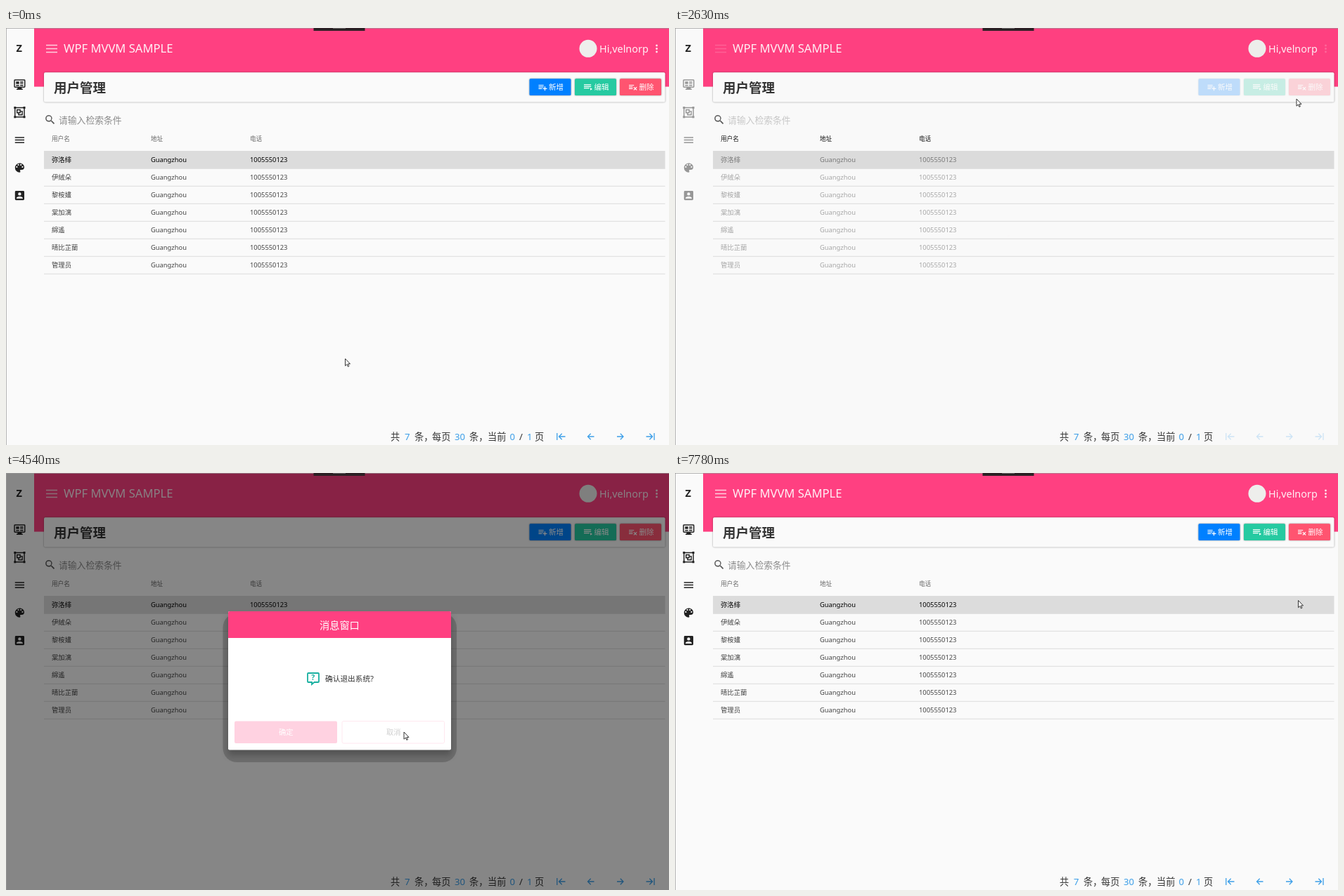
Animation, 943 px wide and 594 px high, one loop 8 s. Source, as an HTML page:

```html
<!DOCTYPE html>
<html lang="zh-CN">
<head>
<meta charset="utf-8">
<title>WPF MVVM SAMPLE</title>
<style>
  html, body { margin: 0; width: 100%; height: 100%; overflow: hidden; background: #fafafa; }
  svg { display: block; width: 100vw; height: 100vh; font-family: "Noto Sans", "Noto Sans CJK SC", "Noto Sans CJK", sans-serif; }
  text { white-space: pre; }
  .line { fill: none; }
  .raised { filter: drop-shadow(0 .7px 1.3px rgba(0, 0, 0, .4)); }
  .off .faint { opacity: .23; }
  .off .soft { opacity: .45; }
  .off .heading { fill: #111; }
  .closing .choice { opacity: .23; }
</style>
</head>
<body>
<svg id="stage" viewBox="0 0 943 594"></svg>
<script>
const PINK = '#ff4081', BLUE = '#3d9fe8', INK = '#222';

// Markup helpers
const rect = (x, y, w, h, fill, extra = '') =>
  `<rect x="${x}" y="${y}" width="${w}" height="${h}" fill="${fill}" ${extra}/>`;
const circle = (x, y, r, fill, extra = '') =>
  `<circle cx="${x}" cy="${y}" r="${r}" fill="${fill}" ${extra}/>`;
const text = (x, middle, size, value, fill = '#333', extra = '') =>
  `<text x="${x}" y="${middle + size * .36}" font-size="${size}" fill="${fill}" ${extra}>${value}</text>`;
const line = (d, color, width, extra = '') =>
  `<path class="line" d="${d}" stroke="${color}" stroke-width="${width}" ${extra}/>`;
const icon = (x, y, scale, d, fill) =>
  `<path transform="translate(${x} ${y}) scale(${scale}) translate(-12 -12)" d="${d}" fill="${fill}" fill-rule="evenodd"/>`;
const group = (cls, ...parts) => `<g class="${cls}">${parts.join('')}</g>`;

const ICONS = {
  dashboard: 'M21 16V4H3V16ZM21 2A2 2 0 0 1 23 4V16A2 2 0 0 1 21 18H16V20H18V22H6V20H8V18H3A2 2 0 0 1 1 16V4A2 2 0 0 1 3 2ZM5 6H11V11H5ZM13 6H19V8H13ZM13 9H19V11H13ZM5 12.500H11V14.500H5ZM13 12.500H19V14.500H13Z',
  frame: 'M1 1V5H2V19H1V23H5V22H19V23H23V19H22V5H23V1H19V2H5V1ZM5 4H19V5H20V19H19V20H5V19H4V5H5ZM6 6V14H9V18H18V9H14V6ZM8 8H12V12H8ZM14 11H16V16H11V14H14Z',
  menu: 'M3 6H21V8H3ZM3 11H21V13H3ZM3 16H21V18H3Z',
  palette: 'M12 3A9 9 0 0 0 12 21A1.5 1.5 0 0 0 13.1 18.5A1.5 1.5 0 0 1 14.2 16H16A5 5 0 0 0 21 11C21 6.6 17 3 12 3Z',
  account: 'M6 17C6 15 10 13.9 12 13.9S18 15 18 17V18H6ZM15 9A3 3 0 0 1 9 9A3 3 0 0 1 15 9ZM3 5V19A2 2 0 0 0 5 21H19A2 2 0 0 0 21 19V5A2 2 0 0 0 19 3H5A2 2 0 0 0 3 5Z',
  search: 'M9.5 3A6.5 6.5 0 0 1 14.4 13.7L14.7 14H15.5L20.5 19 19 20.5 14 15.5V14.7L13.7 14.4A6.5 6.5 0 1 1 9.5 3ZM9.5 5A4.5 4.5 0 0 0 9.5 14A4.5 4.5 0 0 0 9.5 5Z',
  add: 'M2 6H14V8H2ZM2 10H14V12H2ZM2 14H10V16H2ZM16 10H18V14H22V16H18V20H16V16H12V14H16Z',
  edit: 'M2 5H19V7H2ZM2 9H19V11H2ZM2 13H15V15H2ZM17 13V19L22 16Z',
  remove: 'M2 6H14V8H2ZM2 10H11V12H2ZM2 14H11V16H2ZM14.2 10.8L17 13.6 19.8 10.8 21.2 12.2 18.4 15 21.2 17.8 19.8 19.2 17 16.4 14.2 19.2 12.8 17.8 15.6 15 12.8 12.2Z'
};

function sidebar() {
  const names = ['dashboard', 'frame', 'menu', 'palette', 'account'];
  const dots = [[6.5, 10.5], [9.5, 6.5], [14.5, 6.5], [17.5, 10.5]]
    .map(([x, y]) => circle(19.4 + (x - 12) * .735, 199 + (y - 12) * .735, 1.1, '#fafafa'));
  return rect(0, 0, 40, 594, '#fafafa') +
    text(14.4, 28.5, 14.5, 'Z', INK, 'font-weight="700"') +
    group('soft', ...names.map((name, i) => icon(19.4, 80.6 + 39.5 * i, .735, ICONS[name], INK)), ...dots);
}

function header() {
  return rect(40, 0, 903, 83.6, PINK) +
    group('faint', line('M57 24.5h16M57 29.5h16M57 34.5h16', '#ffd0df', 1.6)) +
    text(82, 29.5, 16.6, 'WPF MVVM SAMPLE', '#fff0f5') +
    circle(828, 29.3, 12.5, '#eeeeec') +
    text(844, 30, 14.4, 'Hi,velnorp', '#fff0f5') +
    group('faint', ...[25, 29.5, 34].map(y => circle(925.5, y, 1.4, '#ffe3ec')));
}

function toolbar() {
  const button = (x, color, name, label) => group('faint',
    rect(x, 72.3, 59, 23.7, color, 'rx="1.5" class="raised"'),
    icon(x + 19, 84.5, .6, ICONS[name], '#fff'), text(x + 27.5, 84.3, 10.6, label, '#fff'));
  return rect(54, 63.3, 883.5, 42.2, '#fafafa', 'rx="2" class="raised"') +
    text(68, 85.3, 18.5, '用户管理', '#333', 'font-weight="700"') +
    button(744.5, '#0080ff', 'add', '新增') +
    button(809, '#26caa1', 'edit', '编辑') +
    button(873, '#ff5470', 'remove', '删除');
}

function table() {
  const columns = [65, 206, 347];
  const people = ['弥洛绯', '伊絨朵', '黎桉嫿', '棠加漓', '綿遙', '晴比芷蘭', '管理员'];
  const heads = ['用户名', '地址', '电话'].map((label, i) =>
    text(columns[i], 158.3, 8.6, label, '#666', 'class="heading"'));
  const rows = people.map((name, i) => {
    const y = 175 + 25 * i;
    const cells = [name, 'Guangzhou', '1005550123'].map((value, c) =>
      text(columns[c], y + 13, 9.35, value, i ? '#444' : '#000'));
    return (i ? '' : rect(54, y, 883.5, 25, '#dcdcdc')) +
      (i === 6 ? rect(54, y, 883.5, 25, '#dcdcdc', 'id="rowHover"') : '') +
      group('soft', ...cells) + line(`M54 ${y + 25.3}H937.5`, '#dcdcdc', 1);
  });
  return icon(62.8, 130.6, .74, ICONS.search, '#555') +
    group('soft', text(75, 131, 12.8, '请输入检索条件', '#8c8c8c')) + heads.join('') + rows.join('');
}

function pager() {
  const words = [[547, '共'], [567, '7', BLUE], [581, '条，'], [606, '每页'], [638, '30', BLUE], [659, '条，'],
    [685, '当前'], [716.5, '0', BLUE], [730, '/'], [741, '1', BLUE], [752, '页']];
  const arrow = (tip, dir, length) => `M${tip} 582h${dir * length}M${tip + dir * 4.2} 577.8l${-dir * 4.2} 4.2 ${dir * 4.2} 4.2`;
  return words.map(([x, word, color]) => text(x, 582.5, 13.2, word, color)).join('') +
    group('faint', line('M783.8 577v10M922 577v10' + arrow(786.5, 1, 9) + arrow(827.5, 1, 9) +
      arrow(878, -1, 9) + arrow(919.5, -1, 9), BLUE, 1.3));
}

const MENU_TOPS = [48, 82, 129, 163, 197];

function menu() {
  const labels = ['最小化', '退出系统', 'Kolvub', '视频教程', '加入OV'];
  return `<g id="menu">` + rect(859, 43, 82.5, 194.5, '#fafafa', 'rx="1.5" class="raised"') +
    rect(859, 0, 82.5, 34, '#dedede', 'id="menuHover"') +
    line('M859 123.5h82.5', '#dcdcdc', 1) +
    line('M872 65h8', INK, 1.6) +
    line('M874.2 96.7l3.6 3.6m0-3.6l-3.6 3.6', INK, 1.1) +
    circle(876, 98.5, 4.4, 'none', `stroke="${INK}" stroke-dasharray="2.6 .8"`) +
    circle(876, 146.3, 4.6, INK) + rect(872, 176.3, 8, 8, INK, 'rx="1"') + circle(876, 214, 4.6, INK) +
    labels.map((label, i) => text(887.5, MENU_TOPS[i] + 16.5, 10.8, label)).join('') + '</g>';
}

function windowEdge() {
  return line('M0 .5H943M.5 0V594', '#999', 1, 'opacity=".7"') +
    rect(437.5, 0, 73, 4, '#2b2024') + rect(465, 0, 18, 1, '#666');
}

function dialog() {
  return `<g id="dialog">` +
    rect(308.5, 200, 332.5, 212, 'rgba(0,0,0,.18)', 'rx="20" style="filter:blur(.7px)"') +
    rect(316, 204, 317, 198, 'rgba(0,0,0,.24)', 'style="filter:blur(5px)"') +
    rect(316, 197, 317, 197.5, '#fff', 'rx="2"') +
    `<path d="M316 235V199q0-2 2-2H631q2 0 2 2V235Z" fill="${PINK}"/>` +
    text(446, 217, 14.2, '消息窗口', '#fff', 'font-weight="500"') +
    line('M430 285h14q1 0 1 1v11q0 1-1 1h-5.500l-3.500 3v-3h-5q-1 0-1-1v-11q0-1 1-1Z', '#18b0a0', 1.8) +
    text(434.2, 291.5, 10.5, '?', '#18b0a0', 'font-weight="700"') +
    text(454, 293, 10.7, '确认退出系统?') +
    group('choice', rect(325, 353.5, 146, 31.5, PINK, 'rx="2"'), text(388, 369.5, 10.3, '确定', '#fff')) +
    group('choice', rect(478, 353.5, 145.5, 31.5, '#fff', 'rx="2" stroke="#ffa0be"'), text(541, 369.5, 10.3, '取消')) +
    '</g>';
}

const stage = document.getElementById('stage');
stage.innerHTML = rect(0, 0, 943, 594, '#fafafa') + header() + sidebar() + toolbar() + table() + pager() +
  circle(925.5, 29, 23, '#b6b6b6', 'id="ripple"') + menu() +
  rect(0, 0, 943, 594, '#000', 'id="shade"') + windowEdge() + dialog() +
  '<path id="cursor" d="M0 0V10.200L2.300 8 3.900 11.400 5.400 10.700 3.900 7.400H7Z" fill="#fff" stroke="#222" stroke-width=".9"/>';

const part = Object.fromEntries(['rowHover', 'ripple', 'menu', 'menuHover', 'shade', 'dialog', 'cursor']
  .map(id => [id, document.getElementById(id)]));

// The screen refreshes only at these moments: [first, last, count]
const REFRESHES = [[0, 120, 2], [400, 970, 5], [1400, 2360, 8], [2630, 2750, 2], [2910, 3610, 6], [3760, 3760, 1],
  [4540, 4660, 2], [4840, 4840, 1], [5120, 5540, 4], [5810, 6050, 3], [6200, 6830, 6], [7660, 7780, 2]]
  .flatMap(([first, last, count]) => Array.from({ length: count },
    (_, i) => first + (last - first) * i / Math.max(1, count - 1)));

// Pointer waypoints: [time, x, y]
const TRAIL = [[0, 482.5, 471], [120, 708.5, 494], [400, 760, 420], [540, 850, 140], [680, 905, 60], [970, 917, 32.5],
  [1680, 917, 32.5], [1950, 912, 60], [2360, 906, 100], [2630, 884, 101], [2750, 850, 101.5], [3050, 700, 200],
  [3330, 600, 340], [3610, 562.5, 377], [3760, 566, 369], [4540, 566, 369], [4660, 660, 338], [4840, 813.5, 153.5],
  [5120, 850, 110], [5540, 918, 33], [5810, 918, 33], [5930, 912, 60], [6050, 904.5, 92], [6830, 886.5, 181.5], [8000, 886.5, 181.5]];

const ramp = (t, start, duration) => Math.min(1, Math.max(0, (t - start) / duration));

function pointerAt(t) {
  const next = TRAIL.findIndex(point => point[0] > t);
  const [t0, x0, y0] = TRAIL[next - 1], [t1, x1, y1] = TRAIL[next];
  const k = (t - t0) / (t1 - t0);
  return [x0 + (x1 - x0) * k, y0 + (y1 - y0) * k];
}

function draw(time) {
  const t = REFRESHES.filter(moment => moment <= time).pop();
  const closing = t >= 4540;
  const opacity = (name, value) => part[name].setAttribute('opacity', value);

  part.cursor.setAttribute('transform', `translate(${pointerAt(t)})`);
  opacity('rowHover', t >= 4660 && t < 5120 ? 1 : 0);

  const pressed = t >= 5810 ? 5810 : 1400, since = t - pressed;
  part.ripple.setAttribute('r', 23 * ramp(since, -100, 250));
  opacity('ripple', since >= 0 ? .16 * (1 - ramp(since, 0, 700)) : 0);

  const shown = pressed === 1400 && t >= 2630 ? 0 : ramp(since, 0, 240);
  opacity('menu', shown * (1 - ramp(t, 7540, 240)));
  const hoverY = pointerAt(Math.max(0, t - 120))[1];
  const hovered = MENU_TOPS.find(top => hoverY >= top && hoverY < top + 34);
  part.menuHover.setAttribute('y', hovered || 0);
  opacity('menuHover', hovered ? 1 : 0);

  // The dialog shrinks slightly later than the shade fades
  const open = closing ? 1 - ramp(t, 4490, 300) : ramp(t, 2627, 300);
  const size = closing ? 1 - ramp(t, 4540, 250) : open;
  opacity('shade', .56 * open);
  opacity('dialog', size);
  part.dialog.setAttribute('transform', `translate(474.5 296) scale(${size}) translate(-474.5 -296)`);
  stage.classList.toggle('off', t >= 2630 && !closing);
  stage.classList.toggle('closing', closing);
}

const start = performance.now();
function tick() {
  draw((performance.now() - start) % 8000);
  requestAnimationFrame(tick);
}
tick();
</script>
</body>
</html>
```
